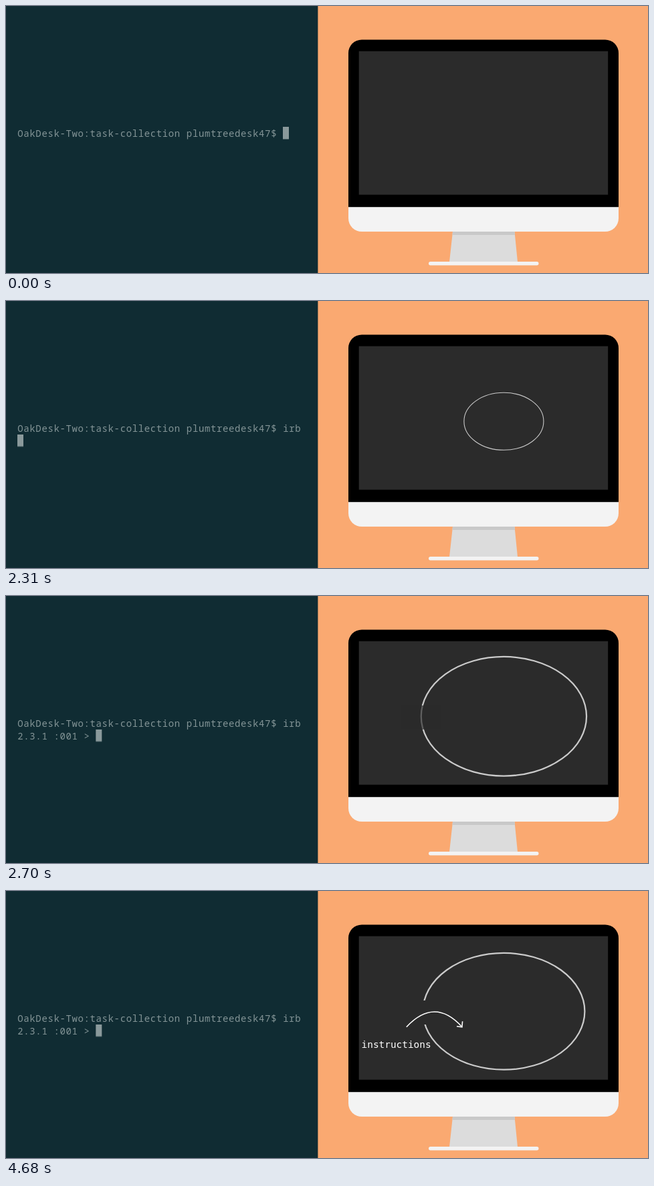
Animation, 960 px wide and 400 px high, one loop 5310 ms. Source, as an HTML page:

```html
<!DOCTYPE html>
<html lang="en">
<head>
<meta charset="utf-8">
<title>Starting a session</title>
<style>
  html, body { margin: 0; width: 100%; height: 100%; overflow: hidden; background: #102c33; }
  svg { display: block; width: 960px; height: 400px; }
  .shell { font: 14px "Noto Sans Mono", "DejaVu Sans Mono", monospace; letter-spacing: .62px; fill: #839496; white-space: pre; }
  .label { font: 14.4px "DejaVu Sans Mono", monospace; fill: #fff; }

  #cursor, #gap, #arrow, .label { animation: 5310ms linear infinite both; }
  #cursor { animation-name: type; animation-timing-function: step-end; }
  #gap { animation-name: gap; }
  #arrow { animation-name: arrow; }
  .label { animation-name: label; }

  @keyframes type {
    0% { transform: translate(414px, 181px); }
    13.559% { transform: translate(423px, 181px); }
    19.209% { transform: translate(432px, 181px); }
    27.683% { transform: translate(441px, 181px); }
    41.242% { transform: translate(17px, 199.5px); }
    45.197%, 100% { transform: translate(134.3px, 199.5px); }
  }
  @keyframes gap {
    0% { opacity: 0; }
    46.327% { opacity: 0; animation-timing-function: steps(12); }
    53.107%, 100% { opacity: 1; }
  }
  @keyframes arrow {
    0% { opacity: 0; }
    67.231% { opacity: 0; animation-timing-function: steps(12); }
    74.011%, 100% { opacity: 1; }
  }
  @keyframes label {
    0% { opacity: 0; }
    80.225% { opacity: 0; animation-timing-function: steps(14); }
    88.135%, 100% { opacity: 1; }
  }
</style>
</head>
<body>
<svg viewBox="0 0 960 400">
  <defs>
    <clipPath id="pane"><rect width="445" height="400"/></clipPath>
    <clipPath id="case"><rect x="512" y="50.5" width="404" height="287.5" rx="20"/></clipPath>
  </defs>

  <!-- terminal -->
  <rect width="467" height="400" fill="#102c33"/>
  <g clip-path="url(#pane)">
    <text class="shell" x="17.3" y="195.5">OakDesk-Two:task-collection plumtreedesk47$ irb</text>
    <text class="shell" x="17.3" y="214.5">2.3.1 :001 &gt;</text>
    <g id="cursor">
      <!-- hides everything not typed yet -->
      <path d="M0 0H450V45H-450V18.5H0Z" fill="#102c33"/>
      <rect width="9" height="18.5" fill="#8a999b"/>
    </g>
  </g>

  <!-- computer -->
  <rect x="466.4" width="493.6" height="400" fill="#faa971"/>
  <path d="M668 338H760.5L765 383.5H663Z" fill="#dcdcdc"/>
  <path d="M668 338H760.5L761 343H667.5Z" fill="#c9c9c9"/>
  <rect x="632" y="383" width="164.5" height="5.4" rx="2.7" fill="#f3f3f3"/>
  <g clip-path="url(#case)">
    <rect x="512" y="50" width="404" height="252" fill="#000"/>
    <rect x="512" y="301.2" width="404" height="38" fill="#f3f3f3"/>
  </g>
  <rect x="527.7" y="67.7" width="372.5" height="215" fill="#2b2b2b"/>

  <!-- diagram -->
  <ellipse id="ring" rx="121" ry="87.4" fill="none" stroke="#cbcbcb" stroke-width="2.2" transform="translate(744.4 180.3) scale(0)"/>
  <rect id="gap" x="590" y="164" width="60" height="36" fill="#2b2b2b"/>
  <g id="arrow" fill="none" stroke="#fff" stroke-width="1.6">
    <path d="M598.8 203.8Q641 158.5 681.7 203.5"/>
    <path d="M674 202.8L681.9 203.8L682.6 195.3"/>
  </g>
  <text class="label" x="531.6" y="235">instructions</text>
</svg>
<script>
  const LOOP = 5310, STEP = 30, START = 2196, PEAK = 320, OVERSHOOT = 0.235;
  const ring = document.getElementById('ring');
  const decay = -Math.log(OVERSHOOT) / PEAK;
  const freq = Math.PI / PEAK;

  // Damped spring, eased out so that it rests by 3210 ms.
  function ringScale(time) {
    const t = time - START;
    if (t <= 0) return 0;
    const swing = Math.exp(-decay * t) * (Math.cos(freq * t) + decay / freq * Math.sin(freq * t));
    const rest = Math.min(1, Math.max(0, (time - 2700) / 510));
    return 1 - swing * (1 - rest) ** 2;
  }

  const origin = performance.now();
  function draw() {
    const time = Math.floor((performance.now() - origin) % LOOP / STEP) * STEP;
    ring.setAttribute('transform', `translate(744.4 180.3) scale(${ringScale(time)})`);
    requestAnimationFrame(draw);
  }
  draw();
</script>
</body>
</html>
```
